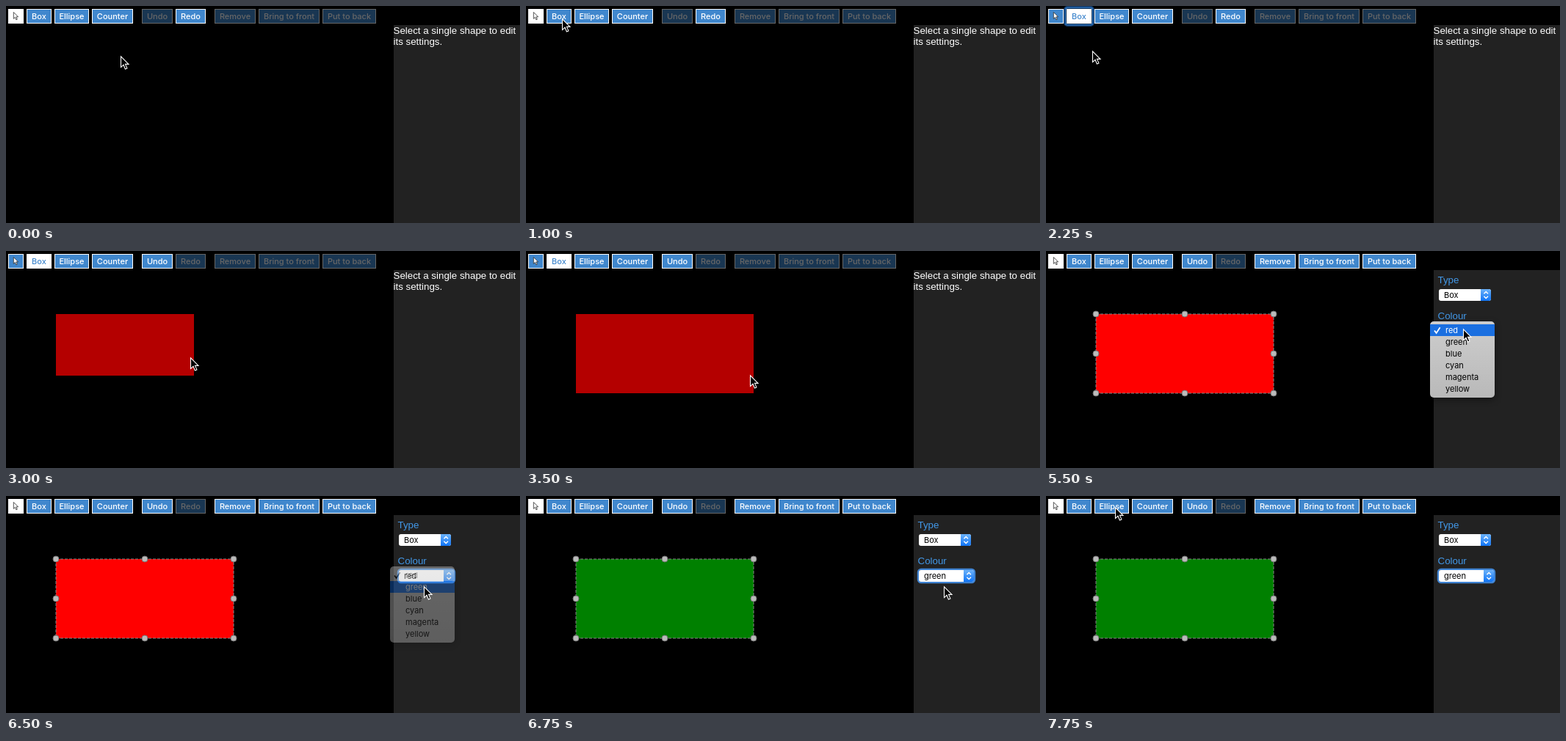
An HTML page that plays this animation: 700 by 296 pixels, repeating every 8 s.

```html
<!DOCTYPE html>
<html lang="en">
<head>
<meta charset="utf-8">
<title>Shape editor</title>
<style>
  html, body { margin: 0; width: 100%; height: 100%; overflow: hidden; background: #000; }
  svg { display: block; }
  text { font: 11px Inter, sans-serif; white-space: pre; }
  .panel text { font: 13.33px "Liberation Sans", Arial, sans-serif; fill: #fff; }
  .panel .label { fill: #4298e8; }
  .btn rect { fill: #4087cd; stroke: #fff; }
  .btn text { fill: #fff; font-weight: 500; text-anchor: middle; }
  .btn.off { opacity: .4; }
  .btn.on rect { fill: #fff; }
  .btn.on text { fill: #4087cd; }
  .row.hot rect { fill: #1a6fe0; }
  .row.hot text { fill: #fff; }
  .row.hot path { stroke: #fff; }
  .row rect { fill: none; }
  .row path { fill: none; stroke: #000; stroke-width: 1.8; }
  #popup { filter: drop-shadow(0 3px 5px rgba(0, 0, 0, .4)); }
</style>
</head>
<body>
<svg id="stage" width="700" height="296" viewBox="0 0 700 296">
  <defs>
    <linearGradient id="blue" x2="0" y2="1">
      <stop stop-color="#6bb2fa"/><stop offset="1" stop-color="#0f74f5"/>
    </linearGradient>
    <linearGradient id="grey" x2="0" y2="1">
      <stop stop-color="#cdcdcd"/><stop offset="1" stop-color="#b9b9b9"/>
    </linearGradient>
    <path id="arrow" d="M.5 .8V15.6L4 12.3L6.4 18L8.9 16.9L6.5 11.4H11Z"/>
  </defs>
  <rect width="700" height="296"/>
  <rect id="shape" x="68" y="86"/>
  <g id="marks"></g>
  <g id="bar"></g>
  <g class="panel">
    <rect x="528" y="26" width="172" height="270" fill="#222"/>
    <g id="hint">
      <text x="527.5" y="38">Select a single shape to edit</text>
      <text x="527.5" y="53">its settings.</text>
    </g>
  </g>
  <g id="settings"></g>
  <g id="popup"></g>
  <use id="cursor" href="#arrow" stroke="#fff" stroke-width="1.1"/>
</svg>
<script>
const LOOP = 8000;
const $ = id => document.getElementById(id);

function add(parent, tag, attrs = {}, text = '') {
  const node = document.createElementNS('http://www.w3.org/2000/svg', tag);
  for (const key in attrs) node.setAttribute(key, attrs[key]);
  node.textContent = text;
  return parent.appendChild(node);
}
const show = (node, on) => node.setAttribute('visibility', on ? 'visible' : 'hidden');

// Toolbar
const ring = add($('bar'), 'g', { fill: 'none' });
add(ring, 'rect', { x: 25.5, y: 1.5, width: 39, height: 25, rx: 3.5, stroke: '#123a68', 'stroke-width': 3 });
add(ring, 'rect', { x: 26.5, y: 2.5, width: 37, height: 23, rx: 2.5, stroke: '#2a6cb4', 'stroke-width': 2 });

const buttons = {};
for (const [name, left, right] of [
  ['Select', 3, 24], ['Box', 28, 62], ['Ellipse', 66, 113], ['Counter', 117, 173],
  ['Undo', 185, 227], ['Redo', 231, 272], ['Remove', 284, 340],
  ['Bring to front', 344, 427], ['Put to back', 431, 504]
]) {
  const g = buttons[name] = add($('bar'), 'g', { class: 'btn' });
  add(g, 'rect', { x: left + .5, y: 4.5, width: right - left - 1, height: 19 });
  if (name === 'Select') {
    add(g, 'use', { href: '#arrow', transform: 'translate(10 8) scale(.6)', fill: '#fff', stroke: '#333', 'stroke-width': 1.4 });
  } else {
    add(g, 'text', { x: (left + right) / 2, y: 18 }, name);
  }
}

// Selection outline and handles
add($('marks'), 'rect', { x: 68, y: 86, width: 242, height: 108, fill: 'none', stroke: '#858585', 'stroke-dasharray': '4 2' });
for (const x of [68, 189, 310]) {
  for (const y of [86, 140, 194]) {
    if (x !== 189 || y !== 140) add($('marks'), 'circle', { cx: x, cy: y, r: 4, fill: '#bbb', stroke: '#777' });
  }
}

// Settings panel
function dropdown(label, y, right, value) {
  const g = add($('settings'), 'g', { class: 'panel' });
  add(g, 'text', { class: 'label', x: 533.5, y: y - 8 }, label);
  const focus = add($('settings'), 'rect', { x: 534, y: y - 1, width: right - 533, height: 18, rx: 4, fill: 'none', stroke: '#3f83d2', 'stroke-width': 2.4 });
  add($('settings'), 'rect', { x: 535, y, width: right - 535, height: 16, rx: 3, fill: '#fff' });
  const x = right - 14;
  add($('settings'), 'path', { d: `M${x} ${y}h11q3 0 3 3v10q0 3-3 3h-11z`, fill: 'url(#blue)' });
  add($('settings'), 'path', { d: `M${x + 4.4} ${y + 6.2}l2.8-2.8l2.8 2.8m0 3.6l-2.8 2.8l-2.8-2.8`, fill: 'none', stroke: '#fff', 'stroke-width': 1.4 });
  return { focus, text: add($('settings'), 'text', { x: 542, y: y + 12 }, value) };
}
show(dropdown('Type', 52, 606, 'Box').focus, false);
const colour = dropdown('Colour', 101, 610, 'red');

// Colour menu
add($('popup'), 'rect', { x: 523, y: 96, width: 88, height: 104, rx: 5, fill: 'url(#grey)' });
const rows = ['red', 'green', 'blue', 'cyan', 'magenta', 'yellow'].map((name, i) => {
  const y = 100 + 16 * i;
  const g = add($('popup'), 'g', { class: 'row' });
  add(g, 'rect', { x: 523, y, width: 88, height: 16 });
  if (!i) add(g, 'path', { d: 'M529 108.5l2.6 3.4l5-7.6' });
  add(g, 'text', { x: 544, y: y + 12 }, name);
  return g;
});

// Each step: start time, pointer x, pointer y, and what changes from then on
const steps = [
  [0, 156, 68, { tool: 'Select', off: ['Undo', 'Remove', 'Bring to front', 'Put to back'], ring: false, size: [0, 0], fill: '#b40000', picked: false, menu: 0, hot: -1, focus: false, value: 'red' }],
  [250, 61, 28],
  [500, 56, 24],
  [750, 47, 20],
  [1000, 49, 17],
  [1750, 49, 17, { tool: 'Box', ring: true }],
  [2250, 63, 61],
  [3000, 251, 145, { ring: false, size: [188, 84], off: ['Redo', 'Remove', 'Bring to front', 'Put to back'] }],
  [3250, 303, 169, { size: [240, 108] }],
  [3500, 305, 169, { size: [242, 108] }],
  [4250, 305, 169, { tool: 'Select', off: ['Redo'], fill: '#f00', picked: true }],
  [4500, 298, 82],
  [4750, 547, 70],
  [5000, 564, 96],
  [5250, 568, 105],
  [5500, 568, 106, { menu: 1, hot: 0 }],
  [6000, 569, 123, { hot: 1 }],
  [6250, 569, 123, { hot: -1 }],
  [6500, 569, 123, { menu: .4, hot: 1, focus: true }],
  [6750, 569, 123, { menu: 0, fill: '#008000', value: 'green' }],
  [7000, 307, 93],
  [7250, 154, 86],
  [7500, 94, 16],
  [7750, 94, 15]
];
let state = {};
const states = steps.map(([at, x, y, change]) => state = { ...state, ...change, at, x, y });

function draw(s) {
  $('cursor').setAttribute('transform', `translate(${s.x} ${s.y})`);
  for (const name in buttons) {
    buttons[name].classList.toggle('on', name === s.tool);
    buttons[name].classList.toggle('off', s.off.includes(name));
  }
  show(ring, s.ring);
  $('shape').setAttribute('width', s.size[0]);
  $('shape').setAttribute('height', s.size[1]);
  $('shape').setAttribute('fill', s.fill);
  for (const id of ['marks', 'settings']) $(id).style.display = s.picked ? '' : 'none';
  show($('hint'), !s.picked);
  show(colour.focus, s.focus);
  colour.text.textContent = s.value;
  $('popup').style.opacity = s.menu;
  rows.forEach((row, i) => row.classList.toggle('hot', i === s.hot));
}

let shown;
function tick() {
  const t = performance.now() % LOOP;
  const now = states.findLast(s => s.at <= t);
  if (now !== shown) draw(shown = now);
  requestAnimationFrame(tick);
}
tick();
</script>
</body>
</html>
```
